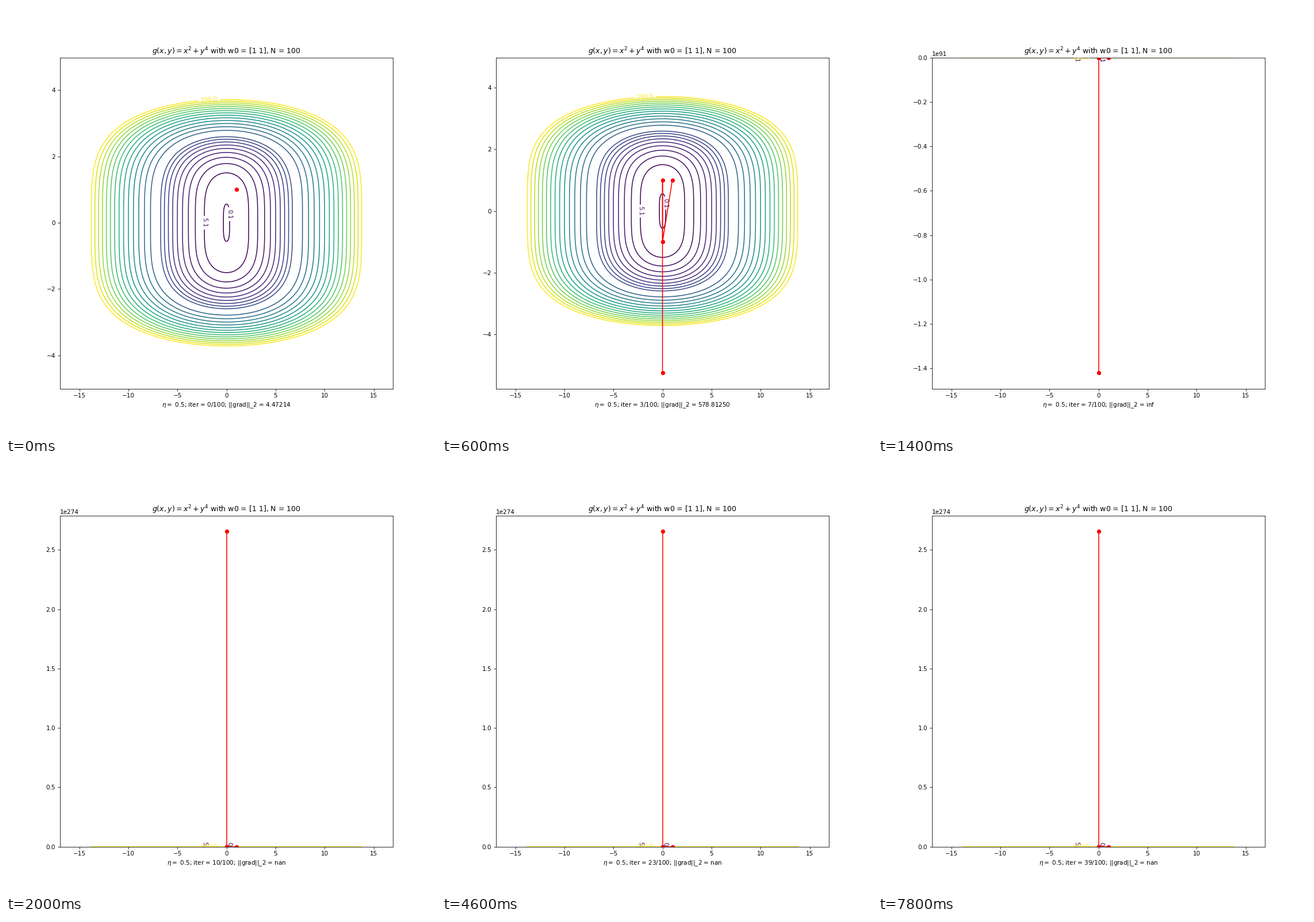
Recreate the animation shown at these times as a matplotlib script. Size 748 by 748 pixels, loop 8 s.

```python
import numpy as np
import matplotlib.pyplot as plt
from matplotlib.animation import FuncAnimation
from matplotlib.collections import LineCollection

FRAMES, INTERVAL = 40, 200
ETA, N = 0.5, 100
X_RANGE = (-17, 16.975)
Y_RANGE = (-5, 4.975)
LEVELS = np.concatenate([np.arange(0.1, 50, 5), np.arange(60, 200, 10)])

# level -> angles where the labelled curve starts and ends
ARCS = {
    0.1: (0.765, 0.0085 + 2 * np.pi),
    5.1: (0.0192 - np.pi, np.pi - 0.0192),
    190.0: (1.779, 1.619 + 2 * np.pi),
}
# text, x, y, rotation, level
LABELS = [
    ("0.1", 0.312, 0.26, -88, 0.1),
    ("5.1", -2.258, 0.005, -90, 5.1),
    ("190.0", -1.76, 3.6975, 3.4, 190.0),
]


def grad(w):
    return np.array([2 * w[0], 4 * w[1] ** 3])


def descend(start, steps):
    """Gradient descent with Nesterov momentum."""
    path = [np.array(start, dtype=float)]
    prev = path[0]
    for k in range(steps):
        w = path[-1]
        look = w + (k - 1) / (k + 2) * (w - prev)
        path.append(look - ETA * grad(look))
        prev = w
    return np.array(path)


def level_curve(level):
    """Points with x^2 + y^4 = level."""
    start, end = (0, 2 * np.pi)
    for key, arc in ARCS.items():
        if np.isclose(key, level):
            start, end = arc
    t = np.linspace(start, end, 480)
    s = np.sin(t)
    x = np.sqrt(level) * np.cos(t)
    y = level ** 0.25 * np.sign(s) * np.sqrt(np.abs(s))
    return np.column_stack([x, y])


def y_limits(ys):
    """Five percent margin, except where the edge is the plot's own border."""
    lo = min(Y_RANGE[0], ys.min())
    hi = max(Y_RANGE[1], ys.max())
    pad, tol = 0.05 * (hi - lo), 1e-5 * (hi - lo)
    bottom = lo if abs(lo - Y_RANGE[0]) <= tol else lo - pad
    top = hi if abs(hi - Y_RANGE[1]) <= tol else hi + pad
    return bottom, top


with np.errstate(all="ignore"):
    path = descend((1, 1), FRAMES)
    norms = [np.sqrt(np.sum(grad(w) ** 2)) for w in path]
finite = path[np.isfinite(path).all(axis=1)]

fig, ax = plt.subplots(figsize=(10, 10), dpi=74.8)
ax.set_xlim(*X_RANGE)
ax.set_title("$g(x, y) = x^2 + y^4$ with w0 = [1 1], N = 100")

norm = plt.Normalize(LEVELS[0], LEVELS[-1])
colors = plt.cm.viridis(norm(LEVELS))
curves = LineCollection([level_curve(v) for v in LEVELS],
                        colors=colors, linewidths=1.5)
ax.add_collection(curves, autolim=False)
for text, x, y, angle, level in LABELS:
    ax.text(x, y, text, rotation=angle, ha="center", va="center",
            fontsize=10, color=plt.cm.viridis(norm(level)), clip_on=True)

trail, = ax.plot([], [], "ro-")


def update(i):
    pts = finite[:i + 1]
    trail.set_data(pts[:, 0], pts[:, 1])
    ax.set_ylim(*y_limits(pts[:, 1]))
    ax.set_xlabel(rf"$\eta = $ {ETA}; iter = {i}/{N}; "
                  f"||grad||_2 = {norms[i]:.5f}")
    return trail,


anim = FuncAnimation(fig, update, frames=FRAMES, interval=INTERVAL,
                     init_func=lambda: update(0), repeat=True, repeat_delay=0)
plt.show()
```
